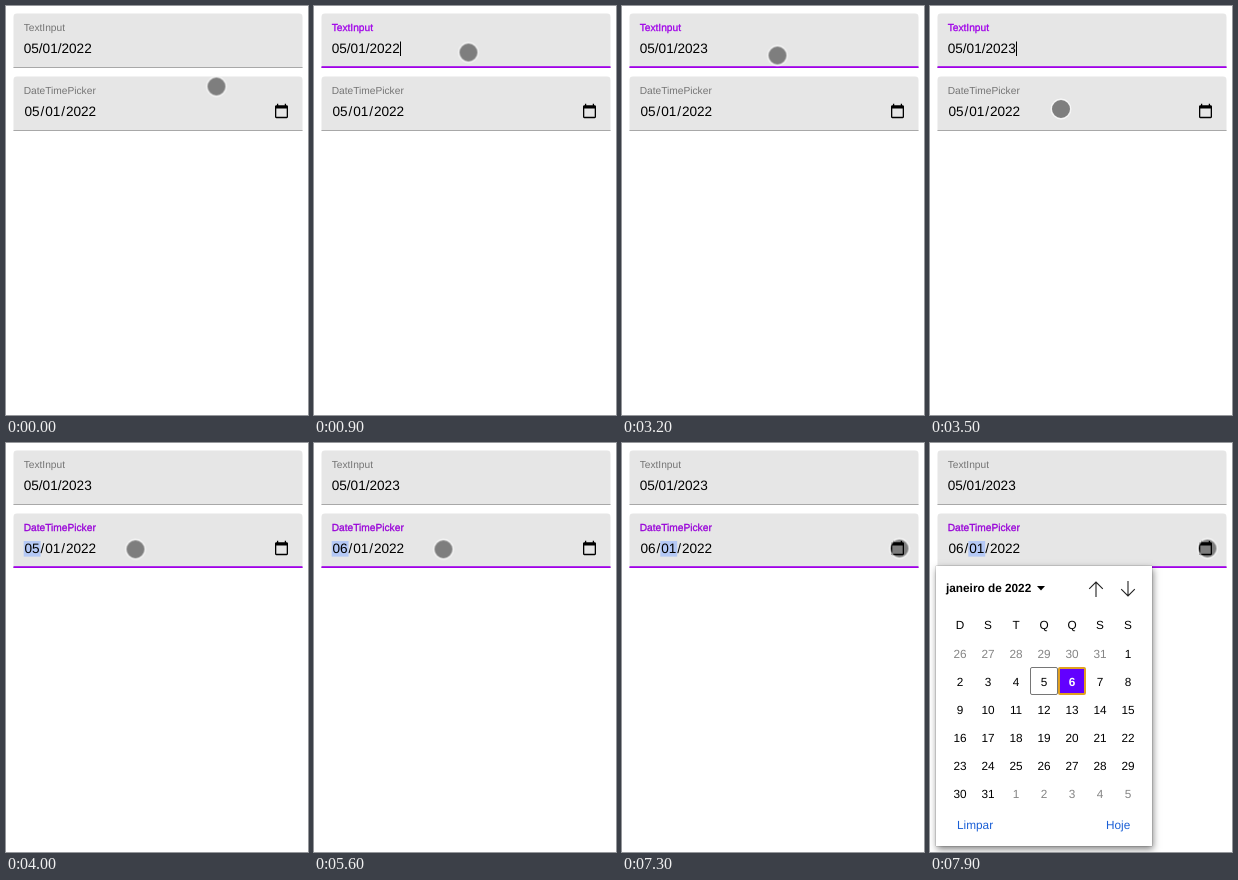
An HTML page for the animation above (8 s loop, 302 by 409 pixels).

```html
<!DOCTYPE html>
<html lang="pt">
<head>
<meta charset="utf-8">
<title>Date inputs</title>
<style>
html, body { margin: 0; width: 100%; height: 100%; overflow: hidden; background: #fff; }
svg { display: block; }
#stage { width: 302px; height: 409px; }
text { font-family: "Liberation Sans", Arial, Helvetica, sans-serif; text-rendering: geometricPrecision; }
.label { font-size: 10.2px; fill: #757575; stroke: transparent; stroke-width: .3px; }
.value { font-size: 13.6px; fill: #000; }
.box { fill: #e6e6e6; }
.line { fill: #a8a8a8; }
.focus { fill: #a000e8; transform-box: fill-box; transform-origin: center; }
.mark { fill: #b5c9f6; }

/* every change is a hard cut on a 100 ms grid */
.anim { animation: 8s step-end infinite; }
#label1 { animation-name: label1; }
#label2 { animation-name: label2; }
#focus1 { animation-name: focus1; }
#focus2 { animation-name: focus2; }
#year2 { animation-name: year2; }
#year3 { animation-name: year3; }
#caret { animation-name: caret; }
#month5 { animation-name: month5; }
#month6 { animation-name: month6; }
#markMonth { animation-name: markMonth; }
#markDay { animation-name: markDay; }
#cursor { animation-name: cursor; }
#popup { animation-name: popup; }

@keyframes label1 {
  0% { fill: #757575; stroke: transparent; }
  11.25% { fill: #a000e8; stroke: #a000e8; }
  48.75% { fill: #8b3baf; stroke: transparent; }
  50%, 100% { fill: #757575; stroke: transparent; }
}
@keyframes label2 {
  0% { fill: #757575; stroke: transparent; }
  48.75% { fill: #8b3baf; stroke: transparent; }
  50%, 100% { fill: #9800d8; stroke: #9800d8; }
}
@keyframes focus1 {
  0% { transform: scaleX(0); }
  11.25% { transform: scaleX(1); }
  48.75% { transform: scaleX(.5); }
  50%, 100% { transform: scaleX(0); }
}
@keyframes focus2 {
  0% { transform: scaleX(0); }
  48.75% { transform: scaleX(.5); }
  50%, 100% { transform: scaleX(1); }
}
@keyframes year2 { 0% { opacity: 1; } 23.75%, 100% { opacity: 0; } }
@keyframes year3 { 0% { opacity: 0; } 30%, 100% { opacity: 1; } }
@keyframes caret {
  0% { opacity: 0; transform: none; }
  11.25% { opacity: 1; transform: none; }
  17.5% { opacity: 0; transform: none; }
  23.75% { opacity: 1; transform: translateX(-7.6px); }
  30% { opacity: 1; transform: none; }
  36.25% { opacity: 0; transform: none; }
  42.5% { opacity: 1; transform: none; }
  48.75%, 100% { opacity: 0; transform: none; }
}
@keyframes month5 { 0% { opacity: 1; } 70%, 100% { opacity: 0; } }
@keyframes month6 { 0% { opacity: 0; } 70%, 100% { opacity: 1; } }
@keyframes markMonth { 0% { opacity: 0; } 48.75% { opacity: 1; } 75%, 100% { opacity: 0; } }
@keyframes markDay { 0% { opacity: 0; } 75%, 100% { opacity: 1; } }
@keyframes cursor {
  0% { transform: translate(210.5px, 80.5px); }
  1.25% { transform: translate(204px, 77px); }
  2.5% { transform: translate(184px, 64px); }
  3.75% { transform: translate(164px, 52px); }
  5% { transform: translate(156px, 48px); }
  7.5% { transform: translate(154.5px, 46.5px); }
  40% { transform: translate(155.5px, 49.5px); }
  41.25% { transform: translate(150px, 66px); }
  42.5% { transform: translate(138px, 90px); }
  43.75% { transform: translate(131px, 103px); }
  45% { transform: translate(129.5px, 106.3px); }
  85% { transform: translate(144.5px, 106.3px); }
  86.25% { transform: translate(180px, 103px); }
  87.5% { transform: translate(222px, 100.5px); }
  88.75% { transform: translate(255px, 101.5px); }
  90% { transform: translate(272px, 104px); }
  91.25%, 100% { transform: translate(277.5px, 105.5px); }
}
@keyframes popup { 0% { opacity: 0; } 97.5% { opacity: .5; } 98.75%, 100% { opacity: 1; } }

#popup { position: absolute; left: 6px; top: 123px; width: 216px; height: 279.5px;
  background: #fff; box-shadow: 1px 3px 7px rgba(0, 0, 0, .5), 0 0 1px rgba(0, 0, 0, .6); }
#popup text { font-size: 11.8px; }
#days text { text-anchor: middle; }
.other { fill: #858585; }
.link { fill: #1a5fd6; }
</style>
</head>
<body>
<svg id="stage" viewBox="0 0 302 409">
  <path class="box" d="M7.5 62V11a3.4 3.4 0 0 1 3.4-3.4H293.1a3.4 3.4 0 0 1 3.4 3.4V62z"/>
  <rect class="line" x="7.5" y="61" width="289" height="1"/>
  <rect class="focus anim" id="focus1" x="7.5" y="60.2" width="289" height="1.8"/>
  <text class="label anim" id="label1" x="17.7" y="25">TextInput</text>
  <text class="value" x="17.7" y="47.2">05/01/202</text>
  <text class="value anim" id="year2" x="78.2" y="47.2">2</text>
  <text class="value anim" id="year3" x="78.2" y="47.2">3</text>
  <rect class="anim" id="caret" x="86" y="35.5" width="1" height="14.5"/>

  <path class="box" d="M7.5 125V74a3.4 3.4 0 0 1 3.4-3.4H293.1a3.4 3.4 0 0 1 3.4 3.4V125z"/>
  <rect class="line" x="7.5" y="124" width="289" height="1"/>
  <rect class="focus anim" id="focus2" x="7.5" y="123.2" width="289" height="1.8"/>
  <text class="label anim" id="label2" x="17.7" y="88">DateTimePicker</text>
  <rect class="mark anim" id="markMonth" x="17.7" y="98" width="16.9" height="15.6"/>
  <rect class="mark anim" id="markDay" x="38.3" y="98" width="16.9" height="15.6"/>
  <text class="value" x="18.5" y="110.2">0</text>
  <text class="value anim" id="month5" x="26.1" y="110.2">5</text>
  <text class="value anim" id="month6" x="26.1" y="110.2">6</text>
  <text class="value" x="34.6" y="110.2">/</text>
  <text class="value" x="39.2" y="110.2">01</text>
  <text class="value" x="55.3" y="110.2">/</text>
  <text class="value" x="59.9" y="110.2">2022</text>
  <path transform="translate(267.7 97.2) scale(.65)" d="M20 3h-1V1h-2v2H7V1H5v2H4c-1.1 0-2 .9-2 2v16c0 1.1.9 2 2 2h16c1.1 0 2-.9 2-2V5c0-1.1-.9-2-2-2zm0 18H4V8h16v13z"/>

  <circle class="anim" id="cursor" r="9.7" fill="#000" fill-opacity=".45" stroke="#fff" stroke-opacity=".85" stroke-width="1.4"/>
</svg>

<div class="anim" id="popup">
  <svg width="216" height="279.5" viewBox="6 123 216 279.5">
    <text x="16" y="149" font-weight="bold">janeiro de 2022</text>
    <path d="M107 143h8l-4 4.5z"/>
    <g fill="none" stroke="#222" stroke-width="1.1">
      <path d="M166 154v-15m-6.8 6.8l6.8-6.8l6.8 6.8"/>
      <path d="M198 138v15m-6.8-6.8l6.8 6.8l6.8-6.8"/>
    </g>
    <rect x="100.5" y="224.5" width="27" height="27" rx="1.5" fill="none" stroke="#767676"/>
    <rect x="129" y="225" width="26" height="26" rx="1" fill="#6200ff" stroke="#e0a020" stroke-width="2"/>
    <g id="days"></g>
    <text class="link" x="27" y="386">Limpar</text>
    <text class="link" x="176" y="386">Hoje</text>
  </svg>
</div>

<script>
const days = document.getElementById("days");

function addCell(label, col, row, attrs = {}) {
  const cell = document.createElementNS("http://www.w3.org/2000/svg", "text");
  cell.textContent = label;
  cell.setAttribute("x", 30 + col * 28);
  cell.setAttribute("y", 186.2 + row * 28 + (row ? 1 : 0));
  for (const key in attrs) cell.setAttribute(key, attrs[key]);
  days.append(cell);
}

[..."DSTQQSS"].forEach((name, col) => addCell(name, col, 0));

for (let i = 0; i < 42; i++) {
  const day = i - 5;
  const attrs = day < 1 || day > 31 ? { class: "other" }
    : day === 6 ? { fill: "#fff", "font-weight": "bold" } : {};
  addCell((day + 30) % 31 + 1, i % 7, Math.floor(i / 7) + 1, attrs);
}
</script>
</body>
</html>
```
